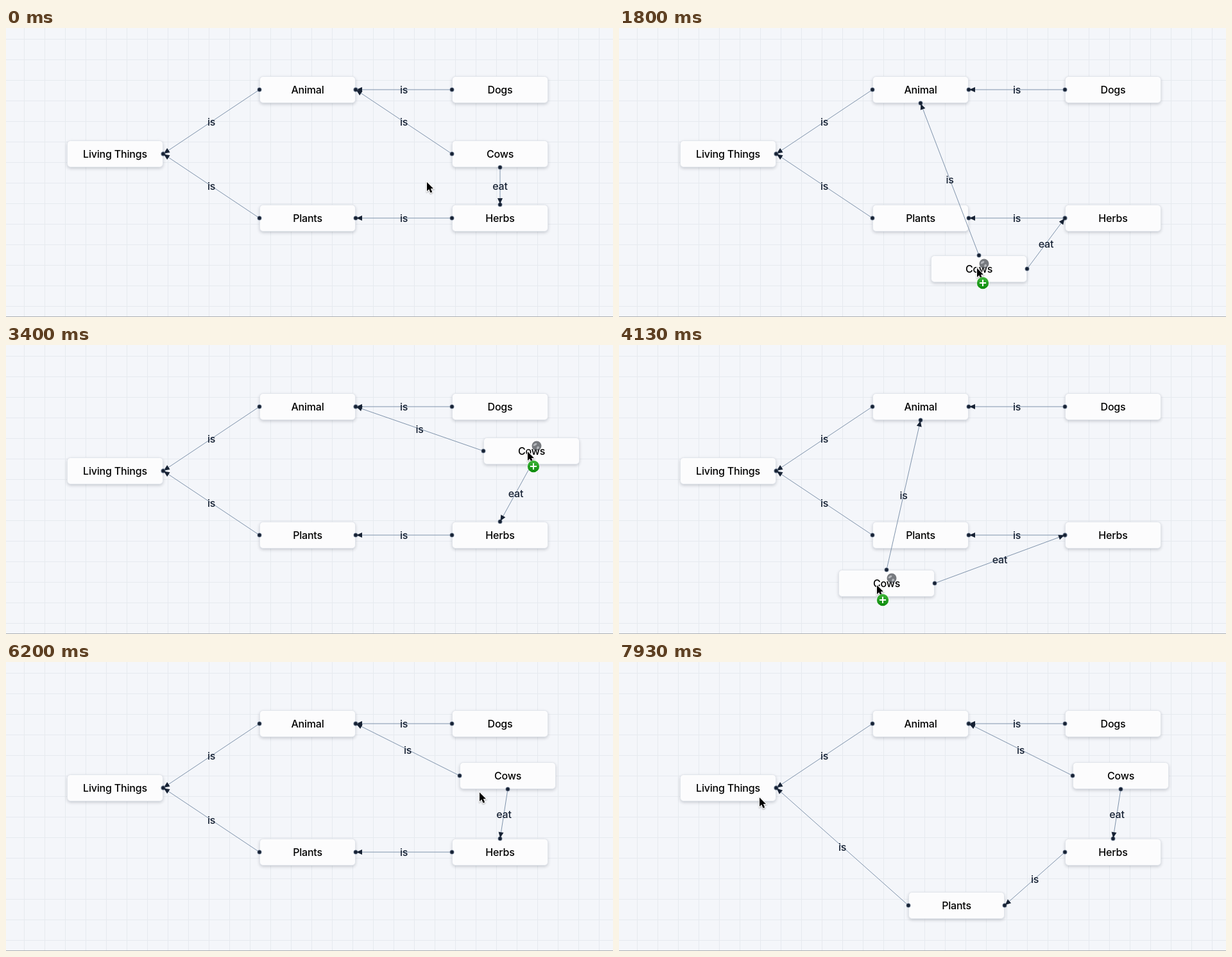
Write an HTML page with a canvas that moves like this. It is 946 px wide and 450 px high and loops after 8000 ms.

```html
<!DOCTYPE html>
<html lang="en">
<head>
<meta charset="utf-8">
<title>Node graph</title>
<style>
  html, body { margin: 0; width: 100%; height: 100%; overflow: hidden; background: #f4f6fa; }
  canvas { display: block; }
</style>
</head>
<body>
<canvas id="stage" width="946" height="450"></canvas>
<script>
const ctx = document.getElementById('stage').getContext('2d');
const LOOP = 8000, STEP = 1000 / 15;
const HALF_W = 75, HALF_H = 21;
const INK = '#172234';

// Turning points of the pointer: [step, x, y]. Dragged nodes follow it LAG steps late.
const LAG = 0.6;
const path = [
  [4, 656, 240], [10, 767, 195], [12, 767, 195],
  [18, 563, 331], [24, 623, 247], [27, 558, 374], [28, 558, 374], [33, 457, 379],
  [41, 644, 260], [51, 816, 164], [62, 414, 370], [71, 285, 405], [80, 627, 232], [90, 779, 176],
  [93.6, 738, 203], [100, 550, 338], [103, 485, 296], [110, 541, 379], [116, 272, 231], [119, 219, 211]
];

const nodes = {
  living: { name: 'Living Things', home: [170, 196] },
  animal: { name: 'Animal', home: [470, 96] },
  dogs: { name: 'Dogs', home: [770, 96] },
  plants: { name: 'Plants', home: [470, 296], grab: 103, release: 110 },
  herbs: { name: 'Herbs', home: [770, 296] },
  cows: { name: 'Cows', home: [770, 196], grab: 12, release: 90 }
};
const edges = [
  ['animal', 'living', 'is'], ['plants', 'living', 'is'], ['dogs', 'animal', 'is'],
  ['cows', 'animal', 'is'], ['herbs', 'plants', 'is'], ['cows', 'herbs', 'eat']
];

const clamp = (value, low, high) => Math.min(high, Math.max(low, value));

const slope = (k, axis) => (path[k + 1][axis] - path[k][axis]) / (path[k + 1][0] - path[k][0]);

function tangent(k, axis) {
  if (k === 0 || k === path.length - 1) return 0;
  const a = slope(k - 1, axis), b = slope(k, axis);
  return a * b <= 0 ? 0 : 2 * a * b / (a + b);
}

// Cubic interpolation with limited tangents, so nothing overshoots its keys.
function pointer(step) {
  const time = clamp(step, path[0][0], path.at(-1)[0]);
  const i = Math.max(0, path.findIndex(key => key[0] >= time) - 1);
  const span = path[i + 1][0] - path[i][0];
  const u = (time - path[i][0]) / span;
  return [1, 2].map(axis => Math.round(
    path[i][axis] + span * slope(i, axis) * u * u * (3 - 2 * u)
    + span * u * (1 - u) * ((1 - u) * tangent(i, axis) - u * tangent(i + 1, axis))));
}

function position({ home, grab, release }, step) {
  if (!grab) return home;
  const from = pointer(grab), to = pointer(clamp(step, grab, release));
  return home.map((value, axis) => value + to[axis] - from[axis]);
}

function circle(x, y, r, fill) {
  ctx.beginPath();
  ctx.arc(x, y, r, 0, 2 * Math.PI);
  ctx.fillStyle = fill;
  ctx.fill();
}

function text(value, x, y, fill) {
  ctx.font = '500 16px Inter, sans-serif';
  ctx.letterSpacing = '-0.2px';
  ctx.textAlign = 'center';
  ctx.fillStyle = fill;
  ctx.fillText(value, x, y + 6);
}

function drawGrid() {
  ctx.fillStyle = '#f4f6fa';
  ctx.fillRect(0, 0, 946, 450);
  ctx.fillStyle = '#e6eaef';
  for (let x = 28; x < 946; x += 32) ctx.fillRect(x, 0, 1, 450);
  for (let y = 17; y < 450; y += 32) ctx.fillRect(0, y, 946, 1);
  ctx.fillStyle = '#adb0b4';
  ctx.fillRect(0, 449, 946, 1);
}

function drawNode(name, [x, y]) {
  ctx.save();
  ctx.beginPath();
  ctx.roundRect(x - HALF_W + 0.5, y - HALF_H + 0.5, 2 * HALF_W - 1, 2 * HALF_H - 1, 5);
  ctx.shadowColor = 'rgba(15, 23, 42, .22)';
  ctx.shadowBlur = 5;
  ctx.shadowOffsetY = 2;
  ctx.fillStyle = '#fcfcfd';
  ctx.fill();
  ctx.shadowColor = 'transparent';
  ctx.strokeStyle = '#e1e5eb';
  ctx.stroke();
  ctx.restore();
  text(name, x, y, '#000');
}

// Edges leave through the sides facing each other along the longer axis.
function drawEdge([ax, ay], [bx, by], label) {
  const dx = bx - ax, dy = by - ay;
  const px = Math.abs(dx) > Math.abs(dy) ? Math.sign(dx) * HALF_W : 0;
  const py = px ? 0 : Math.sign(dy) * HALF_H;
  const x1 = ax + px, y1 = ay + py, x2 = bx - px, y2 = by - py;
  ctx.beginPath();
  ctx.moveTo(x1, y1);
  ctx.lineTo(x2, y2);
  ctx.strokeStyle = '#7f93ab';
  ctx.lineWidth = 1;
  ctx.stroke();
  for (const [x, y] of [[x1, y1], [x2, y2]]) {
    circle(x, y, 3.5, '#8492a6');
    circle(x, y, 2.7, INK);
  }
  ctx.save();
  ctx.translate(x2, y2);
  ctx.rotate(Math.atan2(y2 - y1, x2 - x1));
  ctx.beginPath();
  ctx.moveTo(-1, 0);
  ctx.lineTo(-10, -4);
  ctx.lineTo(-10, 4);
  ctx.fillStyle = INK;
  ctx.fill();
  ctx.restore();
  text(label, (x1 + x2) / 2, (y1 + y2) / 2, INK);
}

function drawGhost(x, y) {
  ctx.save();
  ctx.globalAlpha = 0.75;
  circle(x, y, 7.5, '#4b4f54');
  ctx.fillStyle = '#c9ccd0';
  ctx.beginPath();
  ctx.ellipse(x - 2.5, y - 2, 3.2, 1.6, -0.6, 0, 7);
  ctx.ellipse(x + 2, y + 3, 1.8, 2.4, 0.5, 0, 7);
  ctx.fill();
  ctx.restore();
}

function drawBadge(x, y) {
  circle(x, y, 9.8, 'rgba(255, 255, 255, .75)');
  const green = ctx.createLinearGradient(0, y - 9, 0, y + 9);
  green.addColorStop(0, '#3fb53a');
  green.addColorStop(1, '#0c8a0c');
  circle(x, y, 9.2, green);
  ctx.fillStyle = '#fff';
  ctx.fillRect(x - 5, y - 1, 10, 2);
  ctx.fillRect(x - 1, y - 5, 2, 10);
}

const arrow = new Path2D('M0 0V14L3.2 11L5.6 16.6L8.2 15.5L5.9 10.1H10Z');

function drawCursor(x, y) {
  ctx.save();
  ctx.translate(x, y);
  ctx.shadowColor = 'rgba(0, 0, 0, .35)';
  ctx.shadowBlur = 2;
  ctx.shadowOffsetY = 1;
  ctx.strokeStyle = '#fff';
  ctx.lineWidth = 2;
  ctx.stroke(arrow);
  ctx.shadowColor = 'transparent';
  ctx.fillStyle = '#000';
  ctx.fill(arrow);
  ctx.restore();
}

function draw(step) {
  const at = key => position(nodes[key], step);
  const dragging = Object.values(nodes).some(n => step >= n.grab && step < n.release);
  const [heldX, heldY] = pointer(step);
  const [x, y] = pointer(step + LAG);

  drawGrid();
  for (const key in nodes) drawNode(nodes[key].name, at(key));
  for (const [from, to, label] of edges) drawEdge(at(from), at(to), label);
  if (dragging) drawGhost(heldX + 11, heldY - 7);
  drawCursor(x, y);
  if (dragging) drawBadge(x + 9, y + 23);
}

function tick() {
  draw(Math.floor(((performance.now() + 4) % LOOP) / STEP));
  requestAnimationFrame(tick);
}
tick();
</script>
</body>
</html>
```
